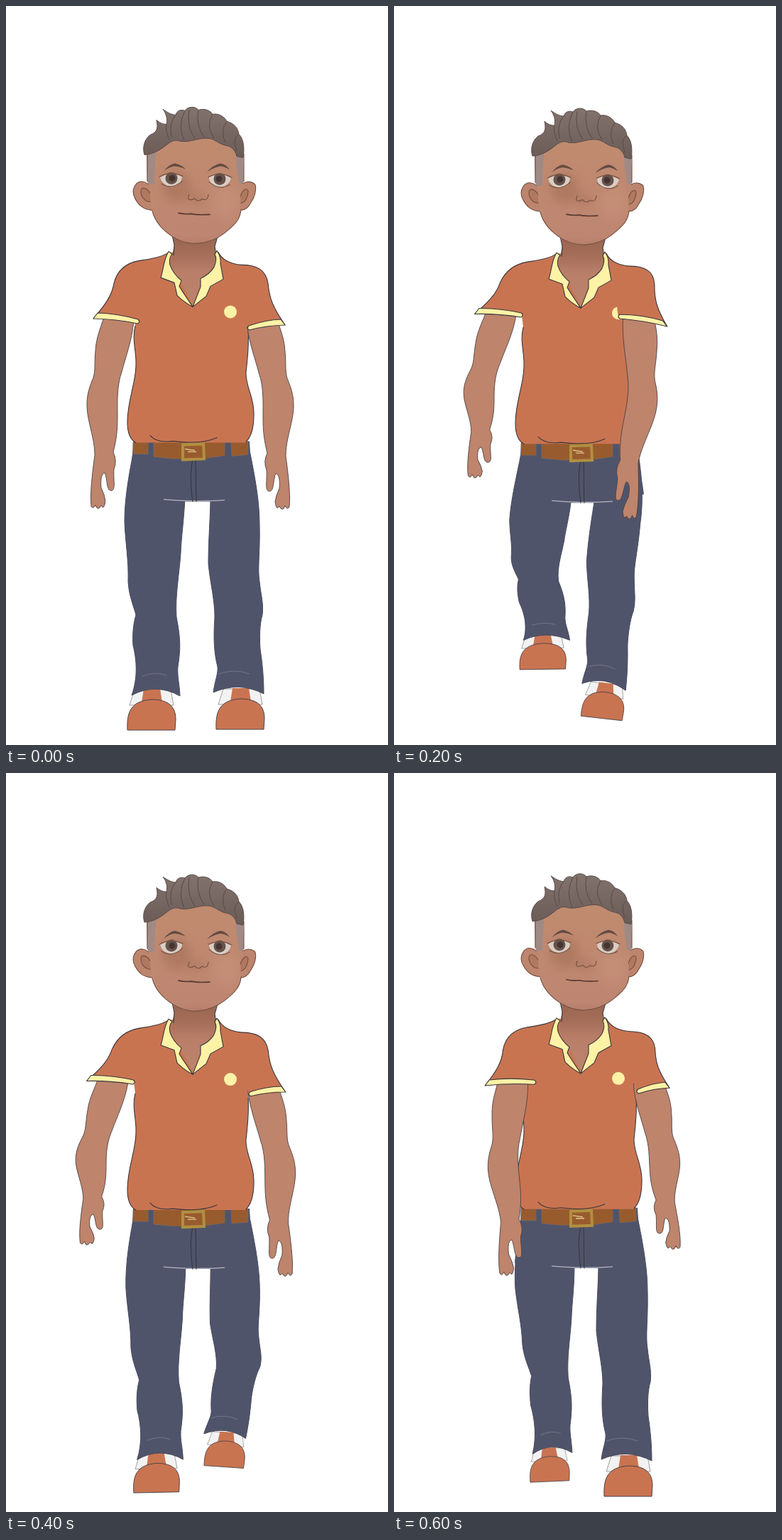
Animation, 538 px wide and 1040 px high, one loop 0.7 s. Source, as an HTML page:

```html
<!DOCTYPE html>
<html lang="en">
<head>
<meta charset="utf-8">
<title>Walk cycle</title>
<style>
  html, body { margin: 0; width: 100%; height: 100%; overflow: hidden; background: #fff; }
  svg { display: block; width: 100vw; height: 100vh; }
  .ink { fill: none; stroke: #3a363c; stroke-width: 1.1; stroke-linecap: round; stroke-linejoin: round; }
  .shirt { fill: #c97451; }
  .denim { fill: #50546b; }
  .skin { fill: #be846c; stroke: #4b4245; stroke-width: .9; stroke-linejoin: round; }
  .cream { fill: #fdf2a6; stroke: #3a363c; stroke-width: 1.1; stroke-linejoin: round; }
  .belt { fill: #985b2e; stroke: #7b6a5c; stroke-width: .7; }
  .fold { fill: none; stroke: #777a8a; stroke-width: .9; }
  .face { fill: none; stroke: #75503f; stroke-width: 1.1; stroke-linecap: round; }
  .lock { fill: none; stroke: #584a48; stroke-width: 1; }
</style>
</head>
<body>
<svg viewBox="0 0 538 1040" preserveAspectRatio="none">
  <defs>
    <linearGradient id="neck" x1="0" y1="0" x2="0" y2="1">
      <stop offset="0" stop-color="#96624e"/><stop offset=".3" stop-color="#a56e59"/>
      <stop offset=".55" stop-color="#b97f69"/><stop offset="1" stop-color="#bb836d"/>
    </linearGradient>
    <linearGradient id="skinTone" x1="0" y1="0" x2="0" y2="1">
      <stop offset="0" stop-color="#c08b6e"/><stop offset="1" stop-color="#be8672"/>
    </linearGradient>
    <linearGradient id="hairTone" x1="0" y1="0" x2="0" y2="1">
      <stop offset="0" stop-color="#83736d"/><stop offset="1" stop-color="#6b5b57"/>
    </linearGradient>
    <filter id="soft" x="-50%" y="-50%" width="200%" height="200%"><feGaussianBlur stdDeviation="7"/></filter>
    <clipPath id="faceClip"><use href="#face"/></clipPath>
    <g id="shoe">
      <path d="M-24 -6L-31 16L31 16L27 -6Z" fill="#f3f2f2" stroke="#8a8688" stroke-width=".8"/>
      <path class="shirt" d="M-11 -7H12L15 12H-14Z"/>
      <path class="shirt" d="M-34 51C-35 28 -31 10 0 8C30 8 34 24 34 36L33 51Z" stroke="#4a4347" stroke-width="1"/>
    </g>
  </defs>

  <g id="legs"></g>

  <g id="body">
    <path class="denim" d="M179 612C178 650 171 670 170 690L253 697H288L352 685C350 665 345 650 343 612Z"/>
    <path d="M222 694Q265 698 308 695" fill="none" stroke="#b4b5bf" stroke-width="1.2"/>
    <path class="ink" d="M263 638C259 655 260 680 263 697M267 638C268 660 267 680 268 697"/>
    <path class="belt" d="M179 613L200 614V630H179ZM208 613H308V632Q260 641 208 634ZM317 613H341V631L318 633Z"/>
    <path d="M249 617L278 616L279 637L249 638Z" fill="#985b2e" stroke="#b0903f" stroke-width="4"/>
    <path d="M252 623L266 625M256 627H268" fill="none" stroke="#e0c98a" stroke-width="1.4"/>

    <path class="shirt" d="M230 346C218 354 200 356 188 358L176 400L182 450C177 470 184 485 183 505C183 530 171 555 171 585C171 600 175 610 183 614H338C347 604 349 590 349 575C350 550 337 535 338 515C341 490 342 470 341 450L350 400L332 364C318 363 306 358 299 346Z"/>
    <path class="ink" d="M182 450C177 470 184 485 183 505C183 530 171 555 171 585C171 600 175 610 183 614M341 456C342 470 341 490 338 515C337 535 350 550 349 575C349 590 347 604 338 613M230 346C218 354 200 356 188 358M299 346C306 360 320 363 332 364M203 604Q212 615 235 612Q275 617 297 607"/>
    <circle cx="316" cy="430" r="9" fill="#fdf2a6"/>

    <path d="M234 318L237 336L231 365L246 386L263 421L275 388L297 360L294 338L299 318Z" fill="url(#neck)"/>
    <path class="ink" d="M234 322L237 336L236 350M298 324L294 338L296 350"/>
    <path class="cream" d="M229 345C222 356 222 370 218 382L237 389L241 407Q251 417 263 423L249 402L244 394L247 386Q235 376 231 364Q229 354 234 349Z"/>
    <path class="cream" d="M297 344Q303 352 302 362L306 384L288 394L282 408L263 423L274 395L274 383Q287 377 293 367Q298 356 294 349Z"/>

    <g class="face" style="fill:#bd846e">
      <path d="M205 256C198 245 187 244 182 252C178 258 178 264 182 271C187 280 193 286 206 287"/>
      <path d="M328 256C334 245 345 245 351 251C353 259 350 269 345 276C341 284 336 288 328 287"/>
      <path d="M203 275C196 275 190 268 190 261C190 255 196 253 203 263M331 277C338 276 341 266 341 260C339 254 333 259 330 268" fill="#b1785f"/>
    </g>
    <path id="face" d="M198 205L199 246C204 258 204 275 206 288C210 304 220 315 236 325C248 332 258 334 268 334C284 333 298 327 308 319C322 308 330 300 331 286C328 274 330 260 335 246L334 205Q265 140 198 205Z" fill="url(#skinTone)"/>
    <g clip-path="url(#faceClip)">
      <g filter="url(#soft)">
        <ellipse cx="240" cy="254" rx="20" ry="22" fill="#a06a54" opacity=".5"/>
        <ellipse cx="268" cy="270" rx="14" ry="8" fill="#a86d57" opacity=".5"/>
        <ellipse cx="310" cy="275" rx="18" ry="22" fill="#c8927a" opacity=".6"/>
        <ellipse cx="266" cy="338" rx="55" ry="7" fill="#9f6654" opacity=".4"/>
      </g>
      <path d="M194 200H212Q209 230 209 250L198 252ZM323 200H338V250L328 249Q324 225 323 200Z" fill="#a08a85"/>
    </g>
    <path class="face" d="M199 208V246M206 288C210 304 220 315 236 325C248 332 258 334 268 334C284 333 298 327 308 319C322 308 330 300 331 286M335 208V246"/>

    <g id="eye">
      <path d="M217 241Q232 231 248 240Q247 252 233 254Q220 252 217 241Z" fill="#d8cec5"/>
      <circle cx="233" cy="242" r="8.5" fill="#68524b"/>
      <circle cx="234" cy="242" r="4.5" fill="#453532"/>
      <path class="face" d="M216 240Q231 231 249 239M219 250Q234 259 248 246"/>
    </g>
    <use href="#eye" transform="translate(534 1) scale(-1 1)"/>
    <path d="M222 232Q230 222 238 221Q247 223 253 229Q243 225 237 225Q230 226 222 232ZM283 233Q292 223 302 221Q310 222 315 230Q307 225 302 225Q294 226 283 233Z" fill="#644b42"/>
    <path class="face" d="M258 265Q254 274 263 272Q266 269 268 273Q273 275 276 271Q284 275 285 265"/>
    <path class="face" d="M243 291Q251 293 261 292Q268 294 287 293" style="stroke:#56382f;stroke-width:1.6"/>

    <path d="M195 209C192 200 194 188 203 181C214 177 214 170 212 160C216 164 221 166 226 166C228 158 225 150 221 145C227 149 231 152 239 153C241 146 247 145 252 147C256 141 266 140 271 146C280 143 288 147 291 152C300 150 308 156 311 162C322 165 327 172 328 180C335 187 336 200 334 213L325 211C323 203 318 197 310 196C300 194 296 188 287 186C270 184 262 192 246 190C238 187 234 190 230 192C220 200 210 208 195 209Z" fill="url(#hairTone)" stroke="#584a48"/>
    <path class="lock" d="M226 166Q224 174 230 188M239 153Q229 164 233 184M252 147Q241 168 251 189M258 146Q254 170 266 186M271 146Q267 168 279 184M291 152Q281 168 293 186M311 162Q301 175 309 192M328 180Q318 185 325 204"/>
  </g>

  <g id="arms"></g>
</svg>
<script>
const $ = id => document.getElementById(id);
const set = (el, attrs) => { for (const k in attrs) el.setAttribute(k, attrs[k]); };
const lerp = (a, b, k) => a + (b - a) * k;
const clamp = v => Math.min(1, Math.max(0, v));
const ease = v => { const k = clamp(v); return k * k * (3 - 2 * k); };
const wave = v => Math.sin(Math.PI * v);

function add(parent, tag, attrs) {
  const el = document.createElementNS('http://www.w3.org/2000/svg', tag);
  set(el, attrs);
  return parent.appendChild(el);
}

// Moves every "x y" pair of a path.
const warp = (d, move) => d.replace(/([\d.]+) ([\d.]+)/g,
  (_, x, y) => move(+x, +y).map(v => v.toFixed(1)).join(' '));

// Joints are { y, dx, dy, s, tilt }; points between two joints are blended.
function bend(joints, cx = 0) {
  return (x, y) => {
    let i = 0;
    while (i < joints.length - 2 && y > joints[i + 1].y) i++;
    const a = joints[i], b = joints[i + 1];
    const k = clamp((y - a.y) / (b.y - a.y));
    const at = (key, rest = 0) => lerp(a[key] ?? rest, b[key] ?? rest, k);
    const off = x - cx;
    return [cx + off * at('s', 1) + at('dx'), y + at('dy') + off * Math.tan(at('tilt') * Math.PI / 180)];
  };
}

// ---- legs: a planted foot slides back for three steps, a lifted one rises for two
const legs = [
  {
    cx: 211, hem: 968, shoeX: -6, plant: 3, lift: 0, slide: 12, height: 78, drift: -1.5, kneeOut: -9, near: .96,
    shape: 'M179 630C173 660 167 695 167 725C168 755 173 780 172 810C173 830 180 845 183 857C179 870 178 885 179 900C184 920 186 945 177 970Q211 952 245 971C244 950 241 945 242 930C246 905 246 890 240 860C238 830 244 800 246 770C247 745 251 720 252 690Z',
    fold: 'M192 943Q211 936 226 942'
  },
  {
    cx: 327.5, hem: 967, shoeX: 2.5, plant: 0, lift: 3, slide: -37, height: 55, drift: -14, kneeOut: 1, near: .83,
    shape: 'M344 630C352 670 357 700 357 730C358 770 354 790 357 810C359 830 363 840 361 857C357 870 357 890 358 905C361 925 363 945 363 968Q328 950 292 966C294 950 299 940 298 930C293 910 292 890 294 860C294 835 288 815 285 785C285 750 288 720 288 690Z',
    fold: 'M299 940Q322 932 343 940'
  }
];

function foot(leg, i) {
  const up = (i - leg.lift) / 2, back = (i - leg.plant) / 3;
  if (up > 0 && up <= 1) {
    return {
      dx: leg.drift + 22 * (up - .75), dy: -leg.height * up ** .7,
      s: leg.near, flat: .85, knee: leg.kneeOut
    };
  }
  const u = back >= 0 && back <= 1 ? back : 0;
  const dx = leg.slide * wave(u / 2), s = 1 - .18 * ease(u);
  return { dx, dy: -13 * u, s, flat: s, knee: .65 * dx };
}

for (const leg of legs) {
  leg.shoe = add($('legs'), 'use', { href: '#shoe' });
  leg.cloth = add($('legs'), 'path', { class: 'denim', stroke: '#474a5c' });
  leg.seam = add($('legs'), 'path', { class: 'fold' });
}

function drawLeg(leg, i) {
  const { cx, hem } = leg, { dx, dy, s, flat, knee } = foot(leg, i);
  const tilt = -.2 * dx;
  const move = bend([
    { y: 660 },
    { y: 720, dx: .45 * knee },
    { y: 850, dx: knee, dy: .62 * dy, s: (1 + s) / 2 },
    { y: hem, dx, dy, s, tilt }
  ], cx);
  set(leg.cloth, { d: warp(leg.shape, move) });
  set(leg.seam, { d: warp(leg.fold, move) });
  set(leg.shoe, {
    transform: `translate(${cx + dx} ${hem + dy}) rotate(${tilt}) scale(${s} ${flat}) translate(${leg.shoeX} 0)`
  });
}

// ---- arms: the hand leads, the other joints follow in proportion
const limb = 'M139 434C134 452 127 465 126 485C124 505 127 515 121 528C114 545 112 560 116 580C120 600 125 615 125 632C122 655 118 685 120 704Q123 709 126 702Q129 712 134 703Q138 710 140 697Q139 688 134 678C133 668 134 658 139 657C143 665 141 682 148 682C155 682 151 668 152 652Q157 640 151 628C157 605 157 590 157 575C157 555 156 535 163 515C168 495 178 470 180 442Z';
const arms = [
  {
    dir: 1, place: (x, y) => [x, y], tip: [123, 440], pit: [187, 447], seam: '200 375',
    shoulder: 'M188 358C170 361 157 370 152 390C149 408 140 420 123 440',
    hand: i => [29 * ease(i - 5) - 18 * Math.abs(wave(i / 3)), -50 * wave(i / 6)]
  },
  {
    dir: -1, place: (x, y) => [519 - x, y + 1], tip: [393, 449], pit: [341, 456], seam: '318 375',
    shoulder: 'M332 364C352 364 366 370 369 390C371 412 376 424 393 449',
    hand: i => i < 4 ? [-78 * ease(i / 3), 16 * wave(i / 3)] : [4, -19 * (i - 4)]
  }
];

for (const arm of arms) {
  arm.parts = ['skin', 'shirt', 'ink', 'cream'].map(name => add($('arms'), 'path', { class: name }));
}

function drawArm({ dir, place, tip, pit, seam, shoulder, hand, parts }, i, bob) {
  const [hx, hy] = hand(i);
  const cuff = [.18 * hx + .15 * hy, .15 * hy];
  const inside = [.42 * hx, -.3 * Math.abs(hx) + .1 * hy];
  const [tx, ty] = tip.map((v, n) => v + cuff[n]);
  const [px, py] = pit.map((v, n) => v + inside[n]);
  const move = bend([
    { y: 445, dx: (cuff[0] + inside[0]) / 2, dy: (cuff[1] + inside[1]) / 2 },
    { y: 548, dx: .6 * hx + .15 * hy, dy: .35 * hy },
    { y: 632, dx: .88 * hx + .06 * hy, dy: .75 * hy },
    { y: 706, dx: hx, dy: hy }
  ]);
  const line = warp(shoulder, bend([{ y: 370, dy: bob }, { y: tip[1], dx: cuff[0], dy: cuff[1] }]));
  const mx = (tx + px) / 2, my = (ty + py) / 2 - 3;
  const d = [
    warp(limb, (x, y) => move(...place(x, y))),
    `${line}Q${mx} ${my} ${px} ${py}Q${px + 6 * dir} ${py - 22} ${seam}Z`,
    line,
    `M${tx} ${ty}l${6 * dir} -8Q${mx} ${my - 8} ${px - dir} ${py - 6}q${4 * dir} 4 ${-dir} 6Q${mx} ${my} ${tx} ${ty}Z`
  ];
  parts.forEach((path, n) => set(path, { d: d[n] }));
}

// ---- clock
const STEP = 100, POSES = 7;
const start = performance.now();
let shown = -1;

function tick() {
  const i = Math.floor((performance.now() - start) / STEP) % POSES;
  if (i !== shown) {
    shown = i;
    const bob = 1 + 1.2 * wave(2 * (i - .6) / POSES);
    set($('body'), { transform: `translate(0 ${bob})` });
    legs.forEach(leg => drawLeg(leg, i));
    arms.forEach(arm => drawArm(arm, i, bob));
  }
  requestAnimationFrame(tick);
}
tick();
</script>
</body>
</html>
```
